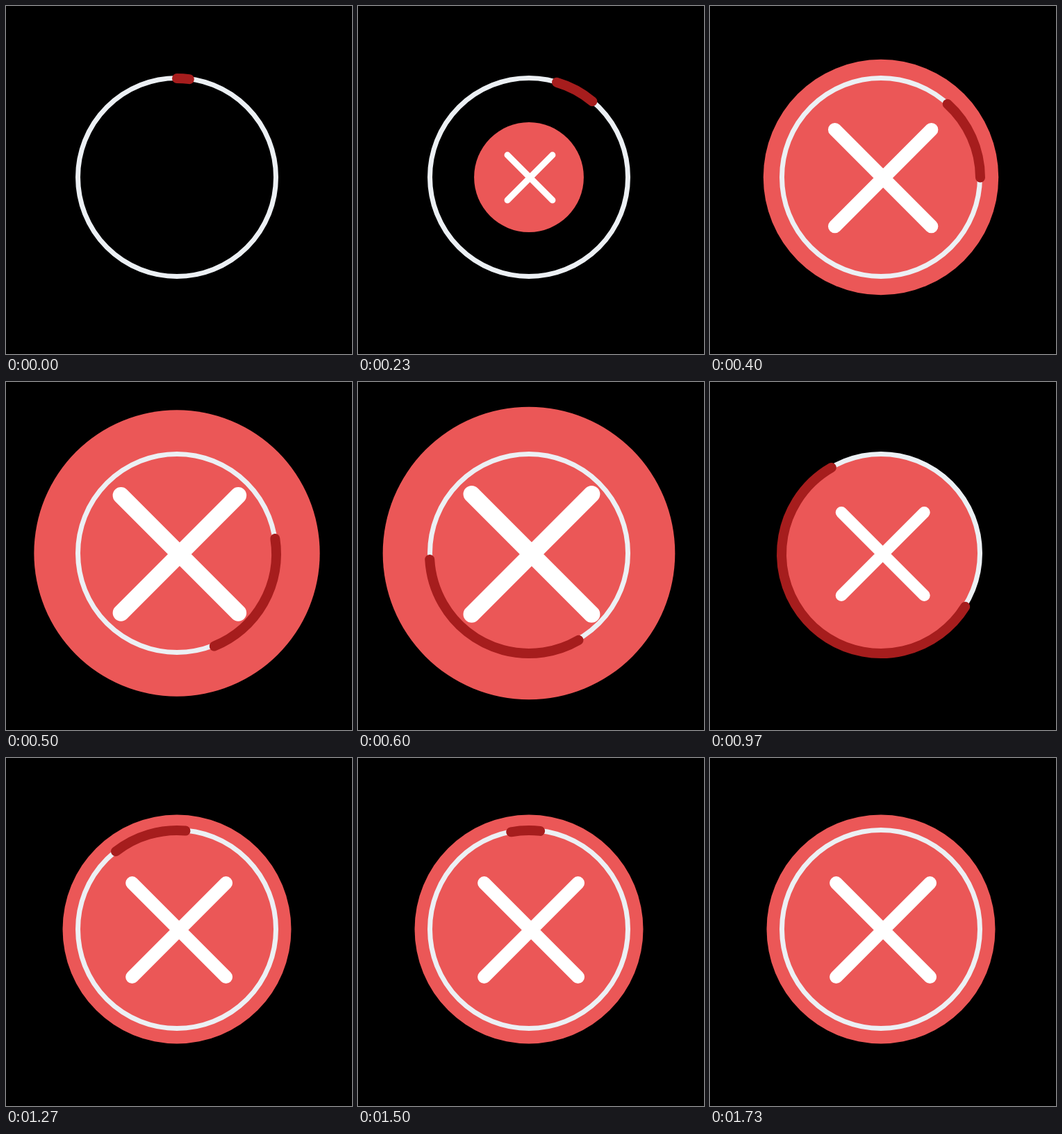
Recreate the animation shown at these times as an HTML page. Size 498 px wide and 500 px high, loop 2.01 s.

```html
<!DOCTYPE html>
<html lang="en">
<head>
<meta charset="utf-8">
<title>Error mark</title>
<style>
  html, body { margin: 0; width: 100%; height: 100%; overflow: hidden; background: #000; }
  svg { display: block; width: 100%; height: 100%; }
</style>
</head>
<body>
<svg viewBox="0 0 498 500">
  <g id="badge">
    <circle r="164.5" fill="#eb5757"/>
    <path d="M-64.4-66.4 70.6 68.6M70.6-66.4-64.4 68.6" stroke="#fff" stroke-width="19" stroke-linecap="round"/>
  </g>
  <circle cx="246" cy="246" r="142.5" fill="none" stroke="#ecf0f4" stroke-width="7"/>
  <circle id="arc" cx="246" cy="247" r="143" pathLength="360" fill="none" stroke="#a61d1d" stroke-width="14" stroke-linecap="round"/>
</svg>
<script>
  const LOOP = 2010, FPS = 30, ARC_END = 52;
  const badge = document.getElementById('badge');
  const arc = document.getElementById('arc');

  // Keys are [frame, value]; angles are degrees clockwise from the top.
  const scaleKeys = [[0, 0], [17, 1.3], [25, 0.8], [34, 1]];
  const tailKeys = [[0, 0], [12, 42], [18, 150], [23, 374], [29, 482], [38, 682], [48, 717.6], [ARC_END, 727]];
  const headKeys = [[0, 7.2], [12, 89.8], [18, 266.8], [23, 540.4], [29, 690.2], [38, 725], [ARC_END, 727]];

  function slope(keys, i) {
    if (i === 0 || i === keys.length - 1) return 0;
    const rate = k => (keys[k + 1][1] - keys[k][1]) / (keys[k + 1][0] - keys[k][0]);
    const a = rate(i - 1), b = rate(i);
    return a * b > 0 ? 2 * a * b / (a + b) : 0;
  }

  // Smooth curve through the keys that never overshoots them.
  function sample(keys, f) {
    const i = keys.findIndex(k => k[0] > f) - 1;
    if (i < 0) return keys[keys.length - 1][1];
    const [t0, v0] = keys[i], [t1, v1] = keys[i + 1];
    const d = t1 - t0, u = (f - t0) / d, w = 1 - u;
    return v0 + (v1 - v0) * u * u * (3 - 2 * u)
      + d * u * w * (w * slope(keys, i) - u * slope(keys, i + 1));
  }

  function draw(f) {
    badge.setAttribute('transform', `translate(246 246) scale(${sample(scaleKeys, f)})`);
    const tail = sample(tailKeys, f), length = sample(headKeys, f) - tail;
    arc.setAttribute('visibility', f < ARC_END ? 'visible' : 'hidden');
    arc.setAttribute('transform', `rotate(${tail - 90} 246 247)`);
    arc.setAttribute('stroke-dasharray', `${Math.max(length, 0.01)} 400`);
  }

  const start = performance.now();
  function tick() {
    const ms = (performance.now() - start) % LOOP;
    draw(Math.floor((ms + 5) * FPS / 1000));
    requestAnimationFrame(tick);
  }
  tick();
</script>
</body>
</html>
```
